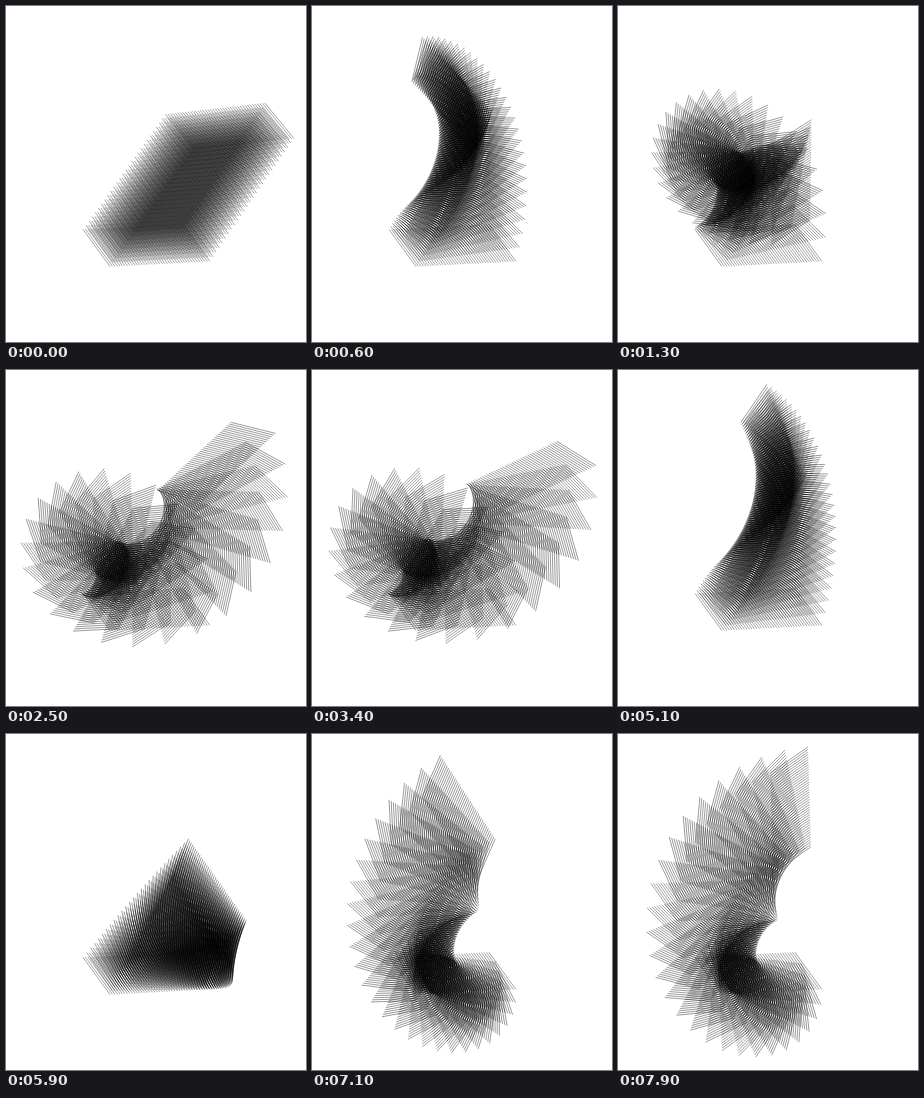
Recreate the animation shown at these times as an HTML page. Size 300x336 px, loop 8000 ms.

```html
<!DOCTYPE html>
<html lang="en">
<head>
<meta charset="utf-8">
<title>Twisting panels</title>
<style>
  html, body { margin: 0; width: 100%; height: 100%; overflow: hidden; background: #fff; }
  svg { display: block; width: 300px; height: 336px; }
  path { fill: none; stroke: #000; stroke-width: .36; }
</style>
</head>
<body>
<svg id="stage" viewBox="0 0 300 336"></svg>
<script>
const LOOP = 8000, STEP = 100;
const PANELS = 28, LINES = 41;
const FIRST = { x: 90.5, y: 242 }, LAST = { x: 174, y: 126 };
const ROW_LENGTH = 100, ROW_ANGLE = -3;
const LINE_LENGTH = 46, LINE_ANGLE = 54;

const polar = (length, degrees) => {
  const a = degrees * Math.PI / 180;
  return { x: length * Math.cos(a), y: length * Math.sin(a) };
};
const mix = (a, b, t) => a + (b - a) * t;

// A row of short parallel lines; the pivot is the middle of the first one.
function hatch() {
  const line = polar(LINE_LENGTH, LINE_ANGLE);
  let d = "";
  for (let i = 0; i < LINES; i++) {
    const middle = polar(ROW_LENGTH * i / (LINES - 1), ROW_ANGLE);
    const x = middle.x - line.x / 2, y = middle.y - line.y / 2;
    d += `M${x.toFixed(2)} ${y.toFixed(2)}l${line.x.toFixed(2)} ${line.y.toFixed(2)}`;
  }
  return d;
}

const stage = document.getElementById("stage");
const shape = hatch();
const panels = Array.from({ length: PANELS }, () => {
  const path = document.createElementNS("http://www.w3.org/2000/svg", "path");
  path.setAttribute("d", shape);
  return stage.appendChild(path);
});

// Turn of the last panel in degrees; the others share it evenly.
const twist = ms => -67 - 339 * Math.cos(2 * Math.PI * (ms - 2800) / 10000);

function draw(ms) {
  const turn = twist(ms);
  panels.forEach((panel, i) => {
    const t = i / (PANELS - 1);
    const x = mix(FIRST.x, LAST.x, t), y = mix(FIRST.y, LAST.y, t);
    panel.setAttribute("transform", `translate(${x} ${y}) rotate(${turn * t})`);
  });
}

const begin = performance.now();
function tick() {
  const ms = (performance.now() - begin) % LOOP;
  draw(Math.floor(ms / STEP) * STEP);
  requestAnimationFrame(tick);
}
draw(0);
requestAnimationFrame(tick);
</script>
</body>
</html>
```
